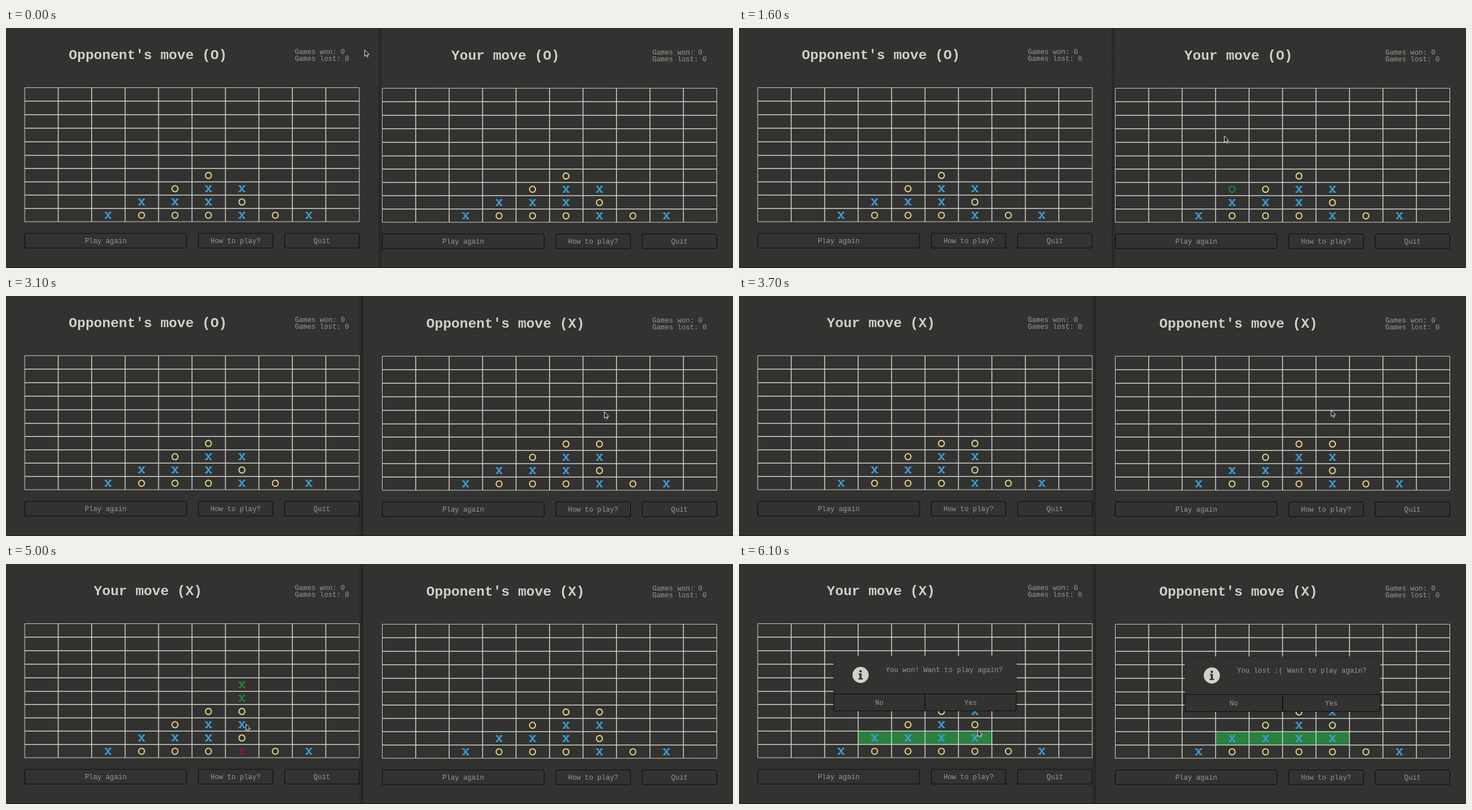
These frames come from a looping animation (1280x424 px, 8 s). An HTML page with a canvas:

```html
<!DOCTYPE html>
<html lang="en">
<head>
<meta charset="utf-8">
<title>Four in a row</title>
<style>
html, body { margin: 0; width: 100%; height: 100%; overflow: hidden; background: #323230; }
canvas { display: block; }
</style>
</head>
<body>
<canvas id="stage" width="1280" height="424"></canvas>
<script>
const c = document.getElementById('stage').getContext('2d');
const LOOP = 8000, TICK = 100, COL = 58.9, CHAR = 7.37;
const BG = '#323230', LINE = '#d3d3cf', DIM = '#999895', GREEN = '#2b8040', RED = '#7d1230';
const PIECE = { X: '#3a9dd3', O: '#e2ce85' };
const ARROW = new Path2D('M.5 .5v11.5l2.6-2.3 1.7 3.8 1.7-.8-1.6-3.7h3.6z');

// pointer glides: start, end, target x, y
const GLIDES = [
  [200, 900, 451, 146], [1000, 1300, 429, 151], [1450, 1780, 1034, 207],
  [1800, 2200, 1053, 204], [3600, 3700, 1042, 201], [3880, 4300, 433, 164],
  [4500, 4600, 429, 170], [4700, 5000, 422, 282], [5500, 5600, 420, 293]
];

function pointerAt(t) {
  let x = 631, y = 38;
  for (const [start, end, toX, toY] of GLIDES) {
    const left = 1 - Math.min(1, Math.max(0, (t - start) / (end - start)));
    const k = 1 - left * left;
    x += (toX - x) * k;
    y += (toY - y) * k;
  }
  return [x, y];
}

const colX = i => 33 + COL * i;
const rowY = i => 105.4 + 23.9 * Math.min(i, 5) + 23.45 * Math.max(0, i - 5);

function text(str, x, y, align = 'left', size = CHAR / 0.6, color = DIM, weight = '') {
  c.font = `${weight} ${size}px "Liberation Mono", "Courier New", monospace`;
  c.fillStyle = color;
  c.textAlign = align;
  c.fillText(str, x, y);
}

function line(x1, y1, x2, y2, color, width) {
  c.strokeStyle = color;
  c.lineWidth = width;
  c.beginPath();
  c.moveTo(x1, y1);
  c.lineTo(x2, y2);
  c.stroke();
}

function button(label, x, y, w, h, round = 3) {
  c.strokeStyle = '#0c0c0c';
  c.lineWidth = 1.1;
  c.beginPath();
  c.roundRect(x, y, w, h, round);
  c.stroke();
  text(label, x + w / 2, y + h / 2 + 4, 'center');
}

function piece(kind, col, row, color = PIECE[kind]) {
  const x = colX(col + 0.5) - 0.5, y = (rowY(row) + rowY(row + 1)) / 2 + 0.4;
  if (kind === 'O') {
    c.strokeStyle = color;
    c.lineWidth = 2.1;
    c.beginPath();
    c.ellipse(x, y, 5.2, 5.4, 0, 0, 7);
    c.stroke();
    return;
  }
  for (const s of [-1, 1]) {
    line(x - 4 * s, y - 5, x + 4 * s, y + 5, color, 2.5);
    for (const v of [-1, 1]) line(x + s * 1.5, y + v * 5.1, x + s * 6.2, y + v * 5.1, color, 1.8);
  }
}

function dialog(message) {
  const w = message.length * CHAR + 115, x = 327.5 - w / 2, y = 163;
  c.fillStyle = BG;
  c.fillRect(x, y, w, 96.5);
  c.strokeStyle = '#2b2b29';
  c.lineWidth = 1;
  c.strokeRect(x, y, w, 67);
  button('No', x, 229.5, w / 2, 30, [0, 0, 0, 3]);
  button('Yes', x + w / 2, 229.5, w / 2, 30, [0, 0, 3, 0]);
  text(message, x + 91.5, 191);
  const ix = x + 47.2;
  c.fillStyle = '#d0d0cd';
  c.beginPath();
  c.arc(ix, 196, 14.2, 0, 7);
  c.fill();
  c.fillStyle = BG;
  c.beginPath();
  c.arc(ix, 189.5, 2.2, 0, 7);
  c.fill();
  c.fillRect(ix - 3.5, 193.5, 5.3, 2);
  c.fillRect(ix - 1.8, 193.5, 3.6, 10);
  c.fillRect(ix - 4, 202, 8, 2);
}

function game(me, moved, over, px, py) {
  const turn = moved ? 'X' : 'O', mine = me === turn;
  text(`${mine ? 'Your' : "Opponent's"} move (${turn})`, 249.9, 55, 'center', 14.67 / 0.6, '#cfcfcb', 'bold');
  text('Games won: 0', 508.4, 45.8);
  text('Games lost: 0', 508.4, 58.3);

  if (over) {
    c.fillStyle = GREEN;
    c.fillRect(colX(3), rowY(8), COL * 4, 23.5);
  }
  for (let i = 0; i <= 10; i++) {
    const w = i % 10 ? 1.5 : 1;
    line(colX(i), rowY(0), colX(i), rowY(10), LINE, w);
    line(colX(0), rowY(i), colX(10), rowY(i), LINE, w);
  }

  // columns from the bottom up; the winning move pops the lowest piece
  const busy = over ? 'OXOX' : moved ? 'XOXO' : 'XOX';
  const cols = ['', '', 'X', 'OX', 'OXO', 'OXXO', busy, 'O', 'X', ''];
  cols.forEach((stack, col) => [...stack].forEach((kind, i) => piece(kind, col, 9 - i)));

  // landing preview under the pointer; low on the board it marks the bottom piece too
  const col = Math.floor((px - colX(0)) / COL);
  if (mine && !over && col in cols && py > rowY(0) && py < rowY(10)) {
    const top = 9 - cols[col].length;
    piece(me, col, top, GREEN);
    if (py > rowY(5)) {
      piece(me, col, top - 1, GREEN);
      piece(me, col, 9, RED);
    }
  }

  button('Play again', 33, 362.7, 285, 26);
  button('How to play?', 338.5, 362.7, 131.5, 26);
  button('Quit', 490.5, 362.7, 131.5, 26);
  if (over) dialog(me === 'X' ? 'You won! Want to play again?' : 'You lost :( Want to play again?');
}

function edge(x, dir) {
  const g = c.createLinearGradient(x, 0, x + dir * 8, 0);
  g.addColorStop(0, 'rgba(0,0,0,.28)');
  g.addColorStop(1, 'rgba(0,0,0,0)');
  c.fillStyle = g;
  c.fillRect(x, 0, dir * 8, 424);
  line(x + 0.5, 0, x + 0.5, 424, '#272725', 1);
}

function arrow(x, y) {
  c.save();
  c.translate(x, y);
  c.fillStyle = '#222';
  c.fill(ARROW);
  c.strokeStyle = '#e8e8e8';
  c.lineWidth = 1;
  c.stroke(ARROW);
  c.restore();
}

function draw(t) {
  const [px, py] = pointerAt(t);
  c.fillStyle = BG;
  c.fillRect(0, 0, 1280, 424);
  game('X', t >= 3200, t >= 6000, px, py);
  c.save();
  c.translate(629.5, 1);
  game('O', t >= 3100, t >= 6100, px - 629.5, py - 1);
  c.restore();

  const rightOnTop = t >= 3100 && t < 5900 || t >= 6100;
  if (rightOnTop) edge(628, -1);
  else edge(656, 1);
  line(0, 0.5, 1280, 0.5, '#292927', 1);
  line(0, 423.5, 1280, 423.5, '#221d1f', 1);
  arrow(px, py);
}

function tick(now) {
  draw(Math.floor(now % LOOP / TICK) * TICK);
  requestAnimationFrame(tick);
}
requestAnimationFrame(tick);
</script>
</body>
</html>
```
